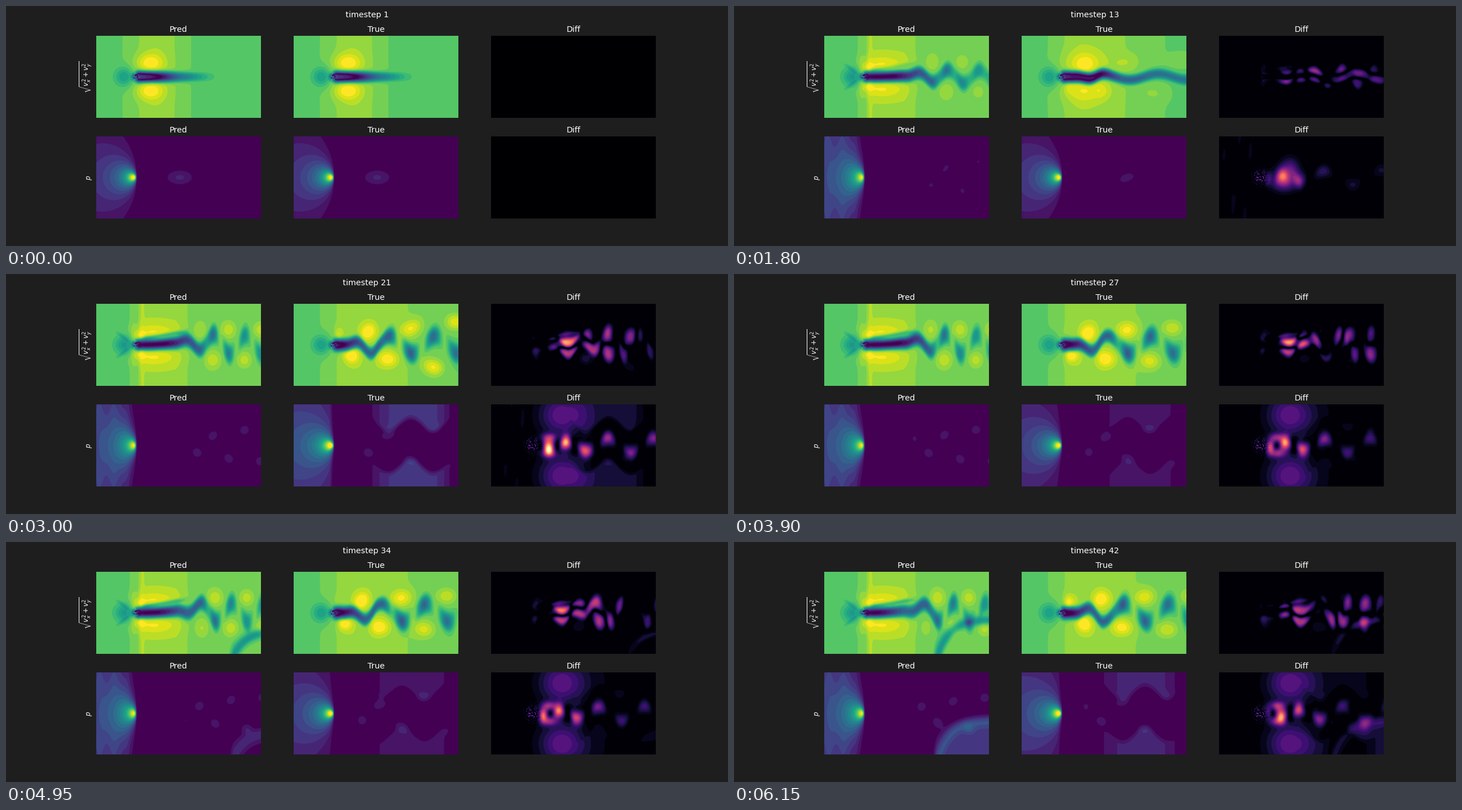
A matplotlib script that plays this animation: 1280x427 px, repeating every 6300 ms.

```python
import numpy as np
import matplotlib as mpl
import matplotlib.pyplot as plt
from matplotlib.animation import FuncAnimation

STEPS, INTERVAL = 42, 150
W, H, BANDS = 292, 146, 20
SCALE = 1280 / 1500

y, x = np.mgrid[0:H, 0:W] + 0.5
dy = y - H / 2
ay = np.abs(dy)
rng = np.random.default_rng(4)
grain = rng.random((H // 2, W // 2)).repeat(2, 0).repeat(2, 1)


def ramp(v, a, b):
    s = np.clip((v - a) / (b - a), 0, 1)
    return s * s * (3 - 2 * s)


def bell(v, width):
    return np.exp(-(v / width) ** 2)


def blob(cx, cy, wx, wy):
    return np.exp(-((x - cx) / wx) ** 2 - ((dy - cy) / wy) ** 2)


def key(t, times, values):
    return np.interp(t, times, values)


def phase_true(t):
    """Vortex street phase, shorter waves close to the cylinder."""
    lam = 80 + 22 * (1 - ramp(t, 17, 21))
    s = x - 148 - 23.4 * (t - 27)
    near = np.where(x < 148, (x - 148) * 19 / 61, 0)
    far = np.where(x > 160, (x - 160) * (80 / lam - 1), 0)
    return 2 * np.pi * (s + near + far) / 80


def phase_pred(t):
    return 2 * np.pi * (x - 213 - 19.7 * (t - 27)) / 56


def ribbon(mid, core_end, core, tail, width):
    inner = ramp(x, 66, 78) * (1 - ramp(x, core_end - 20, core_end + 45))
    depth = inner * core + (1 - inner) * tail * ramp(x, 68, 80)
    return depth * np.exp(-(np.abs(dy - mid) / width) ** 2.6)


def stagnation():
    return 0.2 * blob(50, 0, 16, 16) + 0.5 * blob(68, 0, 5, 6)


def specks():
    return (grain - 0.45) * 0.9 * blob(70, 0, 5, 6)


def speed_true(t):
    ph = phase_true(t)
    shed = ramp(t, 10.5, 17)
    split = ramp(t, 16.5, 21) * ramp(x, 150, 185)
    reach = 222 + 23.4 * (t - 1)

    right = key(t, [1, 9, 17], [46, 84, 140])
    v = 0.73 + 0.11 * bell(x - 108, np.where(x < 108, 47, right))

    steady_x = key(t, [1, 9], [95, 111])
    steady_w = key(t, [1, 9], [23, 34])
    steady_h = key(t, [1, 9], [16, 21])
    front = key(t, [17, 21, 24], [0, 11, 0]) * ramp(x, 190, 260)
    off = 17 + 8 * ramp(x, 87, 150) + 5 * ramp(x, 150, 260) + front
    gain = shed * (0.2 - 0.07 * ramp(x, 100, 270)) * ramp(x, 68, 85)
    gain = gain * (1 + front / 25)
    for side in (-1, 1):
        wave = ((1 + side * np.cos(ph)) / 2) ** 2
        v += (1 - shed) * 0.17 * blob(steady_x, side * 25, steady_w, steady_h)
        v += gain * wave * bell(dy - side * off, 14)

    mid = -shed * 16 * ramp(x, 88, 145) * np.cos(ph - 0.35)
    core_end = key(t, [1, 9, 13, 17, 21], [108, 138, 138, 108, 92])
    tail = 0.5 - 0.16 * ramp(x, 150, 290)
    tail = tail * (1 - split + split * 1.1 * np.cos(ph) ** 2)
    tail = tail * (1 - ramp(x, reach - 105, reach + 5))
    width = 9.5 - (1 - shed) * 2 * ramp(x, 110, 180) + 5 * split + shed
    v -= ribbon(mid, core_end, 1.0 - 0.1 * shed, tail, width) + stagnation()
    return np.abs(v + specks())


def swoosh(t):
    """Slow band that enters at the lower right and creeps upstream."""
    xs = 245 - 5.4 * (t - 34)
    low = 32 - 2.5 * (t - 34)
    fall = np.exp(-np.clip(x - xs, -12, None) / 22)
    drop = (73 - low) * fall
    dist = (dy - low - drop) / np.hypot(1, drop / 22)
    return dist, ramp(t, 29, 34) * ramp(x, xs - 14, xs)


def speed_pred(t):
    ph = phase_pred(t)
    late = ramp(t, 9, 17)
    split = late * ramp(x, 178, 212)
    amp = key(t, [1, 9, 17], [0, 6, 17]) * ramp(x, 135, 205)

    v = 0.73 + 0.06 * ramp(x, 52, 72) + 0.055 * ramp(x, 72, 80)
    v -= 0.06 * ramp(x, 140, 172) + 0.02 * ramp(x, 190, 285)
    v += 0.012 * np.sin(x / 3.1) * ramp(x, 55, 65) * (1 - ramp(x, 78, 92))
    for side in (-1, 1):
        v += 0.11 * blob(102, side * 22, 38, 15)
        v += 0.1 * blob(76, side * 15, 10, 9)
        wave = ((1 + side * np.cos(ph)) / 2) ** 2
        v += late * 0.11 * wave * ramp(x, 165, 200) * bell(dy - side * 27, 14)
        v -= 0.09 * bell(dy - side * (66 - x) * 0.75, 3.5) * bell(x - 48, 11)

    rise = late * 5 * bell(x - 165, 45)
    mid = -amp * np.cos(ph - 0.3) - rise
    core_end = key(t, [1, 9, 17, 21, 27, 34, 42],
                   [108, 125, 152, 138, 146, 125, 112])
    tail = 0.48 - 0.22 * ramp(x, 170, 280)
    tail = tail * (1 - split + split * np.cos(ph) ** 2)
    width = 9.5 + 2 * late * ramp(x, 110, 170) + 4 * split
    v -= ribbon(mid, core_end, 0.84, tail, width) + stagnation()
    streak = ramp(x, 72, 90) * (1 - ramp(x, 140, 170))
    v -= 0.2 * late * streak * bell(dy + 10 + (x - 75) * 0.16, 4)

    dist, on = swoosh(t)
    v -= 0.26 * on * bell(dist, 8)
    return np.abs(v + specks())


def head(spread):
    """Pressure rise ahead of the cylinder."""
    d = np.clip(72 - x, 0, None)
    return 12.2 * d / (d * d + (spread * dy) ** 2 + 34)


def wake_patches(ph, near, gain):
    out = 0
    for side in (-1, 1):
        wave = ((1 - side * np.cos(ph)) / 2) ** 3
        off = 12 + 16 * ramp(x, near, near + 110)
        out = out + gain * wave * bell(dy - side * off, 10)
    return out * ramp(x, near - 25, near + 5)


def pressure_true(t):
    ph = phase_true(t)
    shed = ramp(t, 10.5, 16)
    swing = 0.035 * np.cos(2 * np.pi * (t - 21) / 1.71)
    lift = ramp(t, 17, 20) * (0.065 + swing)
    p = head(1) + lift * ramp(72 - x, 0, 10)

    cx = key(t, [1, 9, 14], [148, 174, 190])
    tilt = 0.2 * ramp(t, 4, 9) * (x - cx)
    lone = np.exp(-((x - cx) / 24) ** 2 - ((dy + tilt) / 13.5) ** 2)
    p += 0.11 * (1 - shed) * lone

    near = wake_patches(ph, 118, 0.085 * shed)
    p += near * (1 - 0.7 * ramp(x, 200, 270))
    for side in (-1, 1):
        edge = 37 + 11 * side * np.cos(ph)
        zone = ramp(side * dy, edge - 8, edge + 8)
        span = ramp(x, 118, 175) * (1 - ramp(x, 250, 292))
        p += (0.03 + 1.25 * lift) * ramp(t, 17, 20) * zone * span
    return p


def pressure_pred(t):
    ph = phase_pred(t)
    late = ramp(t, 9, 16)
    p = head(0.75) * 0.92 + 0.085 * ramp(72 - x, 0, 30)
    drift = np.sin(x / 4.2 + 0.4 * np.sin(t))
    p += 0.018 * drift * ramp(62 - x, 0, 10) * ramp(ay, 12, 60)
    p += wake_patches(ph, 165, 0.085 * late)
    early = 1 - late
    p += early * 0.085 * (blob(203, -10, 18, 7) + blob(256, 8, 46, 11))
    dist, on = swoosh(t)
    fill = ramp(dist, -14, 6) * ramp(t, 31, 42)
    p += on * (0.11 * bell(dist, 12) + 0.17 * fill)
    return p


def speed_error(pred, true):
    gap = np.clip(np.abs(pred - true) - 0.075, 0, None)
    return 1.15 * gap * bell(dy, 62) * ramp(x, 62, 76)


def pressure_error(t, pred, true):
    ph = phase_true(t)
    shed = key(t, [10, 17, 42], [0, 1, 0.85])
    side_gain = key(t, [14, 17, 21], [0, 0.15, 1])
    early = key(t, [1, 4, 9, 14, 17], [0, 0.4, 1, 0.7, 0])
    on = ramp(t, 1, 5)

    power = 0.85 - 0.6 * ramp(x, 100, 230) + 0.25 * bell(t - 18.5, 3) * ramp(x, 90, 130)
    mid = (3 + 10 * ramp(x, 90, 220)) * np.cos(ph)
    e = shed * power * ramp(x, 78, 96) * np.cos(ph) ** 2 * bell(dy - mid, 12)
    e += early * 0.3 * (blob(112, 7, 21, 16) + blob(126, -13, 16, 22))
    e += early * 0.2 * blob(118, 0, 26, 24)
    for side in (-1, 1):
        e += 0.3 * side_gain * blob(126, side * 54, 40, 38) * ramp(side * dy, 8, 20)
        e += 0.42 * side_gain * blob(103, side * 13, 13, 8)
    gap = np.abs(pred - true)
    e += 0.9 * np.clip(gap - 0.03, 0, None) * ramp(x, 78, 90) * side_gain
    stripes = np.sin(x / 3.7 + dy / 40) + 0.6 * np.sin(x / 9 - dy / 25)
    fade = key(t, [1, 9, 21, 27], [0, 1, 0.7, 0.35])
    e += 0.055 * fade * stripes * (1 - ramp(x, 50, 72)) * ramp(ay, 18, 40)
    e += on * 0.75 * np.clip(grain - 0.4, 0, 1) * blob(72, 0, 12, 12)
    return np.clip(e, 0, 1)


def paint(field, cmap, floor=0):
    """Filled bands with one-pixel soft edges."""
    u = np.clip(field, 0, 0.999) * BANDS
    gy, gx = np.gradient(u)
    edge = np.round(u)
    soft = np.clip((u - edge) / (np.hypot(gx, gy) + 1e-6) + 0.5, 0, 1)
    level = np.clip(edge - 1 + soft, 0, BANDS - 1) / (BANDS - 1)
    return cmap(np.maximum(level, floor), bytes=True)


def fields(t):
    keep = ramp(t, 1, 7)
    v = speed_true(t)
    v_hat = v + keep * (speed_pred(t) - v)
    p = pressure_true(t)
    p_hat = p + keep * (pressure_pred(t) - p)
    if t == 1:
        return v_hat, v, np.zeros_like(v), p_hat, p, np.zeros_like(p)
    return (v_hat, v, speed_error(v_hat, v),
            p_hat, p, pressure_error(t, p_hat, p))


plt.rcParams.update({
    "font.family": "DejaVu Sans",
    "font.size": 10 * SCALE,
    "text.color": "white",
    "axes.labelcolor": "white",
    "axes.titlepad": 6 * SCALE,
    "axes.labelpad": 4 * SCALE,
})
# A hair over 4.27 in, so rounding down still gives 427 px.
fig, axes = plt.subplots(2, 3, figsize=(12.8, 4.27001), dpi=100,
                         facecolor="#1e1e1e")
viridis, magma = mpl.colormaps["viridis"], mpl.colormaps["magma"]
heading = fig.suptitle("timestep 1")
images = []
for row in axes:
    for ax, name in zip(row, ("Pred", "True", "Diff")):
        ax.set_title(name)
        ax.set(xticks=[], yticks=[])
        ax.spines[:].set_visible(False)
        blank = np.zeros((H, W, 4), np.uint8)
        images.append(ax.imshow(blank, interpolation="nearest"))
axes[0, 0].set_ylabel(r"$\sqrt{v_x^2+v_y^2}$")
axes[1, 0].set_ylabel("$p$")


def draw(i):
    t = i + 1
    heading.set_text(f"timestep {t}")
    for n, (im, f) in enumerate(zip(images, fields(t))):
        if n % 3 == 2:
            im.set_data(paint(f, magma, 0.012 if t > 1 else 0))
        else:
            im.set_data(paint(f, viridis))
    return [heading, *images]


anim = FuncAnimation(fig, draw, frames=STEPS, interval=INTERVAL,
                     repeat=True, repeat_delay=0, blit=False)
plt.show()
```
